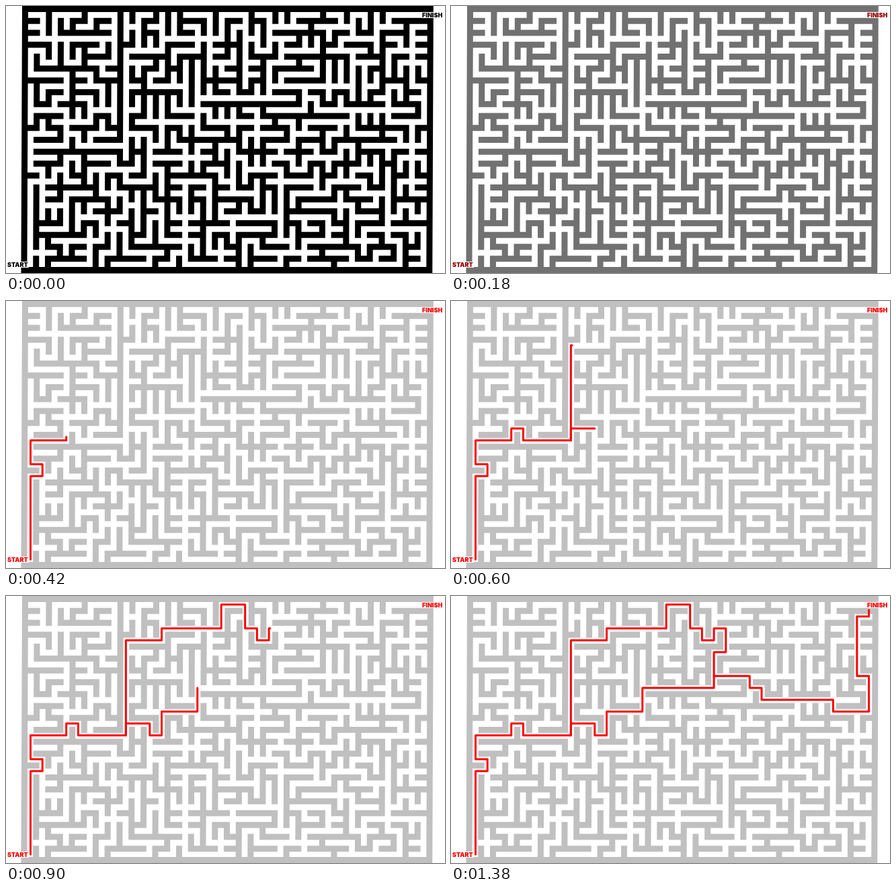
An HTML page with a canvas for the animation above (1.41 s loop, 653 by 398 pixels).

```html
<!DOCTYPE html>
<html lang="en">
<head>
<meta charset="utf-8">
<title>Maze</title>
<style>
  html, body { margin: 0; width: 653px; height: 398px; overflow: hidden; background: #fff; }
  canvas { display: block; }
</style>
</head>
<body>
<canvas id="stage" width="653" height="398"></canvas>
<script>
const ctx = document.getElementById('stage').getContext('2d');
const COLS = 34, ROWS = 22, CELL = 17.73, LOOP = 1410, STEP = 60;

// Corners of the two solutions, as runs in cells: vertical, horizontal, vertical...
const mainRoute = { col: 0, row: 21, runs: [-7, 1, -1, -1, -2, 3, -1, 1, 1, 4, -8, 3, -1, 5, -2, 2, 2, 1, 1,
  1, -1, 1, 2, -1, 2, 3, 1, 1, 1, 6, 1, 3, -3, -1, -5, 1, -0.55] };
const sideRoute = { col: 8, row: 11, runs: [-1, 2, 1, 1, -2, 3, -2, 6, -1] };

let seed = 7;
const random = () => (seed = (seed * 16807) % 2147483647) / 2147483647;

const group = Array.from({ length: COLS * ROWS }, (_, i) => i);
const find = i => group[i] === i ? i : (group[i] = find(group[i]));
const open = new Set(), kept = new Set();
const key = (down, c, r) => `${down ? 'v' : 'h'}${c},${r}`;
const sides = (down, c, r) => [r * COLS + c, down ? r * COLS + c - 1 : (r - 1) * COLS + c].map(find);

function carve(down, c, r) {
  const [a, b] = sides(down, c, r);
  group[a] = b;
  open.add(key(down, c, r));
}

function carveRoute({ col, row, runs }) {
  runs.forEach((run, n) => {
    const d = Math.sign(run);
    for (let i = 1; i <= Math.abs(run); i++) {
      if (n % 2) { carve(true, Math.max(col, col + d), row); col += d; }
      else { carve(false, col, Math.max(row, row + d)); row += d; }
    }
  });
}

function keepWall(down, c, r, length) {
  for (let i = 0; i < length; i++) kept.add(key(down, down ? c : c + i, down ? r + i : r));
}

// Joins all cells into one tree by removing walls in random order.
function buildMaze() {
  carveRoute(mainRoute);
  carveRoute(sideRoute);
  keepWall(true, 8, 3, 8);
  keepWall(true, 12, 13, 5);
  keepWall(false, 1, 5, 5);
  keepWall(false, 1, 12, 7);

  const walls = [];
  for (let r = 0; r < ROWS; r++) for (let c = 0; c < COLS; c++) {
    if (c) walls.push({ down: true, c, r, order: random() });
    if (r) walls.push({ down: false, c, r, order: random() });
  }
  walls.sort((a, b) => a.order - b.order);

  const path = new Path2D();
  path.rect(28.5, 4.5, COLS * CELL, 389);
  for (const { down, c, r } of walls) {
    const [a, b] = sides(down, c, r), id = key(down, c, r);
    if (a !== b && !kept.has(id)) carve(down, c, r);
    if (open.has(id)) continue;
    const x = 28.5 + c * CELL, y = 4.5 + r * CELL;
    path.moveTo(x, y);
    path.lineTo(down ? x : x + CELL, down ? y + CELL : y);
  }
  return path;
}

function routePath({ col, row, runs }) {
  const path = new Path2D();
  const x = () => 36.5 + col * CELL, y = () => 12.8 + row * CELL;
  path.moveTo(x(), y());
  runs.forEach((run, n) => {
    if (n % 2) col += run; else row += run;
    path.lineTo(x(), y());
  });
  return path;
}

const maze = buildMaze(), mainPath = routePath(mainRoute), sidePath = routePath(sideRoute);

function drawRoute(path, cells) {
  if (cells <= 0) return;
  ctx.setLineDash([cells * CELL, 9999]);
  ctx.stroke(path);
}

// Cells covered by the main line; its pace changes at each key time.
function mainLength(t) {
  const keys = [[240, 0.5], [600, 30.1], [900, 49.1], [1140, 61], [1380, 82]];
  if (t < keys[0][0]) return 0;
  const i = Math.max(1, keys.findIndex(([time]) => t <= time));
  const [t0, v0] = keys[i - 1], [t1, v1] = keys[i];
  return v0 + (v1 - v0) * (t - t0) / (t1 - t0);
}

function label(text, x, y) {
  ctx.fillStyle = '#fff';
  ctx.fillRect(x - 1, y - 8, 33, 9);
  ctx.fillStyle = ctx.strokeStyle;
  ctx.fillText(text, x, y);
}

function draw(now) {
  const step = Math.floor((now % LOOP) / STEP), t = step * STEP;
  const grey = step < 2 ? 0 : 192 - 79 * Math.max(0, 4 - step);

  ctx.fillStyle = '#fff';
  ctx.fillRect(0, 0, 653, 398);
  ctx.save();
  ctx.transform(1, 0, -0.004, 1, 0, 0);
  ctx.strokeStyle = `rgb(${grey},${grey},${grey})`;
  ctx.lineWidth = 9;
  ctx.lineCap = 'square';
  ctx.stroke(maze);
  ctx.restore();

  ctx.save();
  ctx.strokeStyle = `rgb(${grey / 192 * 255},0,0)`;
  ctx.font = '900 9px Inter, Arial, sans-serif';
  label('START', 2, 389);
  label('FINISH', 619, 17);
  ctx.lineWidth = 3;
  ctx.lineCap = ctx.lineJoin = 'round';
  drawRoute(mainPath, mainLength(t));
  drawRoute(sidePath, 3 + (t - 600) * 0.03);
  ctx.restore();
  requestAnimationFrame(draw);
}
requestAnimationFrame(draw);
</script>
</body>
</html>
```
